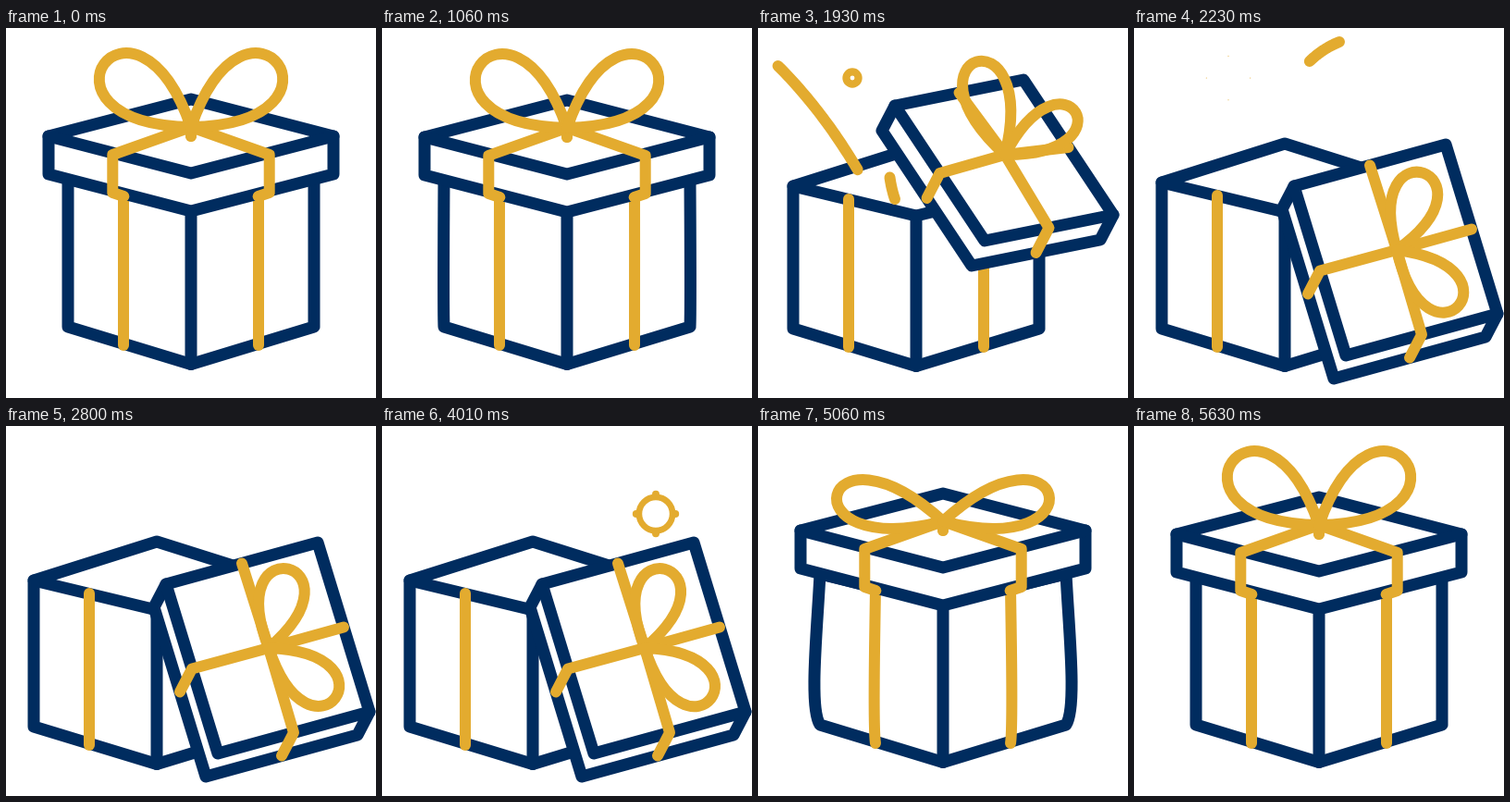
Write an HTML page with a canvas that moves like this. It is 400 px wide and 400 px high and loops after 5.66 s.

```html
<!DOCTYPE html>
<html lang="en">
<head>
<meta charset="utf-8">
<title>Gift box</title>
<style>
  html, body { margin: 0; height: 100%; overflow: hidden; background: #fff; }
  canvas { display: block; width: 100vw; height: 100vh; }
</style>
</head>
<body>
<canvas id="stage" width="400" height="400"></canvas>
<script>
const ctx = document.getElementById('stage').getContext('2d');
const NAVY = { color: '#002c5f', width: 13 };
const GOLD = { color: '#e3ab2f', width: 12 };
const LOOP = 5660, STEP = 30, START = 1000, REVERSE = 3830, STEPS = 60;

const clamp = x => Math.max(0, Math.min(1, x));

// Eases through keys [time, ...values]; every turn of a value lies on a key.
function track(u, ...keys) {
  const last = keys.length - 1;
  if (u <= keys[0][0]) return keys[0].slice(1);
  if (u >= keys[last][0]) return keys[last].slice(1);
  const n = keys.findIndex(key => key[0] > u) - 1;
  const h = keys[n + 1][0] - keys[n][0], s = (u - keys[n][0]) / h, r = 1 - s;
  return keys[n].slice(1).map((a, k) => {
    const i = k + 1, b = keys[n + 1][i];
    const slope = j => j < 0 || j >= last ? 0
      : (keys[j + 1][i] - keys[j][i]) / (keys[j + 1][0] - keys[j][0]);
    const tangent = j => {
      const p = slope(j - 1), q = slope(j);
      return p * q > 0 ? 2 * p * q / (p + q) : 0;
    };
    return a + (b - a) * s * s * (3 - 2 * s)
      + h * (tangent(n) * s * r * r - tangent(n + 1) * s * s * r);
  });
}

function stroke({ color, width }) {
  ctx.strokeStyle = color;
  ctx.lineWidth = width;
  ctx.stroke();
}

function line(points, pen) {
  ctx.beginPath();
  points.forEach(p => ctx.lineTo(...p));
  stroke(pen);
}

function panel(points, pen) {
  ctx.beginPath();
  points.forEach(p => ctx.lineTo(...p));
  ctx.closePath();
  ctx.fillStyle = '#fff';
  ctx.fill();
  stroke(pen);
}

function drawBody(u) {
  const [slide] = track(u, [1570, 0], [1930, -29], [2050, -37]);
  const [bulge] = track(u, [1000, 0], [1480, 11], [1570, 6], [1750, 0]);
  const [rim] = track(u, [1000, 160], [1480, 180], [1570, 160], [1930, 171], [2050, 167]);
  const [base] = track(u, [1570, 323], [1930, 325]);
  const middle = 200 + slide;
  const left = [middle - 133, rim], right = [middle + 133, rim];
  const front = [middle, rim + 32], back = [middle, rim - 42], bottom = [middle, base + 40.5];
  const upright = (x, top, foot, swell) => {
    ctx.moveTo(x, top);
    ctx.bezierCurveTo(x + swell / 2, top + 60, x + swell * 2, foot - 18, x, foot);
  };

  panel([left, back, right, front], NAVY);
  ctx.beginPath();
  upright(left[0], rim, base, -bulge);
  ctx.lineTo(...bottom);
  ctx.lineTo(right[0], base);
  upright(right[0], rim, base, bulge);
  stroke(NAVY);
  line([front, bottom], NAVY);
  for (const side of [-1, 1]) {
    ctx.beginPath();
    upright(middle + side * 73, rim + 14, base + 20, side * bulge / 4);
    stroke(GOLD);
  }
}

function drawStreamer(curve, tail, head) {
  tail = clamp(tail);
  head = clamp(head);
  if (head <= tail) return;
  const at = t => [0, 1].map(k => {
    const r = 1 - t, [a, b, c, d] = curve.map(p => p[k]);
    return r * r * r * a + 3 * r * r * t * b + 3 * r * t * t * c + t * t * t * d;
  });
  line(Array.from({ length: 33 }, (_, i) => at(tail + (head - tail) * i / 32)), GOLD);
}

function drawBurst(x, y, age) {
  if (age <= 0 || age >= 335) return;
  const radius = 5.5 + Math.min(age, 180) * 0.07;
  const width = Math.min(8 + age / 60, (290 - age) / 15);
  if (width > 0) {
    ctx.beginPath();
    ctx.arc(x, y, radius, 0, 7);
    stroke({ ...GOLD, width });
  }
  if (age < 60) return;
  ctx.fillStyle = GOLD.color;
  const reach = radius + 2 + Math.max(0, age - 135) / 50;
  for (let i = 0; i < 4; i++) {
    const angle = i * Math.PI / 2;
    ctx.beginPath();
    ctx.arc(x + reach * Math.cos(angle), y + reach * Math.sin(angle),
      5.5 * clamp((335 - age) / 200), 0, 7);
    ctx.fill();
  }
}

function drawConfetti(u) {
  drawStreamer([[128, 190], [105, 145], [65, 80], [9, 29]], (u - 1869) / 245, (u - 1773) / 170);
  const bend = 126 + 15 * clamp((u - 1930) / 120);
  drawStreamer([[148, 185], [bend, 120], [160, 40], [222, 15]], (u - 2070) / 200, (u - 1912) / 153);
  drawBurst(102, 54, u - 1915);
  drawBurst(296, 95, u - 2430);
}

// Teardrop from the knot: one cubic whose far end lies `length` away.
function drawBowLoop([x, y], degrees, length, width) {
  const control = side => {
    const angle = degrees * Math.PI / 180, reach = length * 4 / 3, spread = side * width / 0.577;
    return [x + reach * Math.cos(angle) - spread * Math.sin(angle),
      y + reach * Math.sin(angle) + spread * Math.cos(angle)];
  };
  ctx.beginPath();
  ctx.moveTo(x, y);
  ctx.bezierCurveTo(...control(1), ...control(-1), x, y);
  stroke(GOLD);
}

function drawLid(u) {
  const [x] = track(u, [1570, 200], [1930, 266], [2050, 282], [2140, 283]);
  const [y] = track(u, [1000, 117], [1480, 139], [1570, 113], [1750, 80],
    [1930, 143], [2050, 234], [2140, 240]);
  // Half diagonals of the top face, and the depth of the sides.
  const across = track(u, [1570, 154, 0], [1930, 118, 59], [2050, 110, 67], [2140, 110, 69]);
  const along = track(u, [1570, 0, 40], [1930, -21, 87], [2050, -51, 113], [2140, -54, 114]);
  const drop = track(u, [1570, 0, 41], [1930, -14, 27], [2140, -13, 25]);
  const [lift] = track(u, [1570, 10], [1930, 6], [2050, 0]);
  const [open] = track(u, [1570, 0], [1930, 1]);

  const at = (p, q, depth = 0) => [
    x + p * across[0] + q * along[0] + depth * drop[0],
    y + p * across[1] + q * along[1] + depth * drop[1]];
  panel([at(-1, 0), at(0, -1), at(1, 0), at(1, 0, 1), at(0, 1, 1), at(-1, 0, 1)], NAVY);
  line([at(-1, 0), at(0, 1), at(1, 0)], NAVY);

  const knot = [x + open, y - lift];
  for (const side of [-1, 1]) {
    const p = side * (0.55 - 0.05 * open);
    const end = at(p, 0.5, 1);
    const ribbon = [knot, at(p, 0.5), end];
    if (u < 1600) ribbon.push([end[0] - side * 12, end[1] + 4]);
    line(ribbon, GOLD);
    line([knot, at(side * open / 2, -open / 2)], GOLD);
  }

  const age = Math.max(0, u - 2140);
  const sway = 9 * Math.exp(-age / 180) * Math.sin(age / 70);
  const [leftAngle, leftLength, leftWidth] = track(u, [1480, 216, 116, 62],
    [1570, 194, 118, 49], [1930, 253, 105, 48], [2050, 263, 99, 44], [2140, 284, 88, 48]);
  const [rightAngle, rightLength, rightWidth] = track(u, [1480, -36, 116, 62],
    [1570, -14, 118, 49], [1930, -31, 89, 42], [2050, 3, 85, 46], [2140, 37, 90, 48]);
  drawBowLoop(knot, leftAngle + sway, leftLength, leftWidth);
  drawBowLoop(knot, rightAngle + sway, rightLength, rightWidth);
}

function frame(now) {
  const t = now % LOOP;
  const step = t < REVERSE
    ? Math.min(STEPS, Math.max(0, Math.floor((t - START) / STEP)))
    : Math.max(0, STEPS - Math.floor((t - REVERSE) / STEP));
  const u = START + step * STEP;
  ctx.fillStyle = '#fff';
  ctx.fillRect(0, 0, 400, 400);
  ctx.lineCap = ctx.lineJoin = 'round';
  drawBody(u);
  drawConfetti(u);
  drawLid(u);
  requestAnimationFrame(frame);
}
requestAnimationFrame(frame);
</script>
</body>
</html>
```
